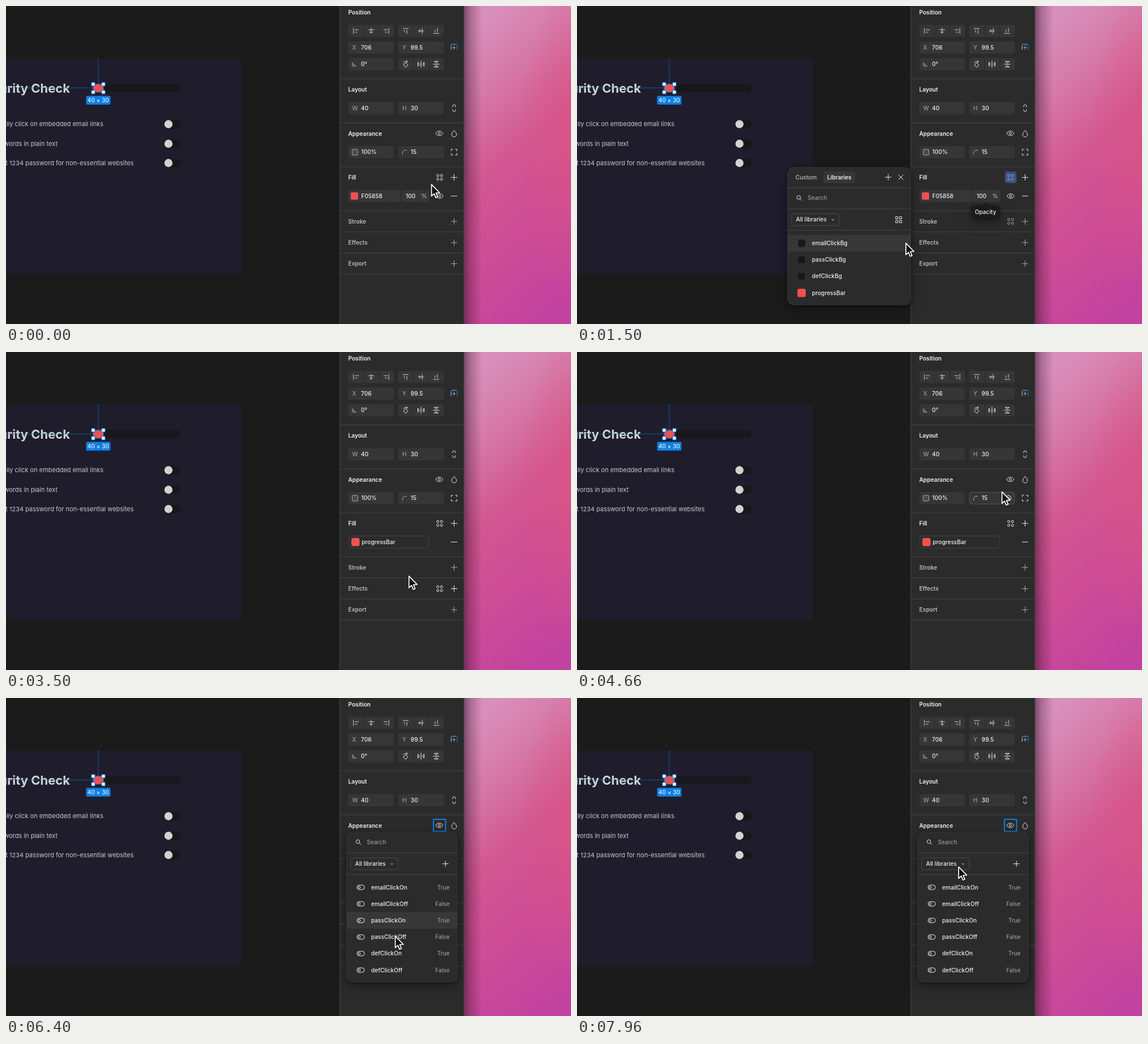
Write an HTML page that moves like this. It is 998x561 px and loops after 8 s.

```html
<!DOCTYPE html>
<html lang="en">
<head>
<meta charset="utf-8">
<title>Design panel</title>
<style>
  html, body { margin: 0; width: 100%; height: 100%; overflow: hidden; background: #1b1b1c; }
  svg { display: block; width: 998px; height: 561px; }
  text { font: 500 10.06px Inter, sans-serif; fill: #f2f2f2; letter-spacing: .005em; white-space: pre; }
  .bold { font-weight: 600; }
  .dim { fill: #9a9a9a; }
  .soft { fill: #bdbdbd; }
  .body { font-size: 11px; font-weight: 400; fill: #c9c8cb; letter-spacing: 0; }
  .title { font-size: 22px; font-weight: 700; fill: #d3d3d2; letter-spacing: 0; }
  .icon { fill: none; stroke: #ececec; stroke-width: 1; }
  .faint { stroke: #a8a8a8; }
  .popup { filter: drop-shadow(0 2px 3px #0007) drop-shadow(0 7px 11px #0004); }
  #cursor { filter: drop-shadow(0 1px 1px #0006); }
  #cursor path { fill: #111; stroke: #fff; stroke-width: 1.7; stroke-linejoin: round; }
</style>
</head>
<body>
<svg id="stage" viewBox="0 0 998 561" xmlns="http://www.w3.org/2000/svg"></svg>
<script>
const LOOP = 8000, BLUE = '#0d7fe3', RED = '#ef5150', FIELD = '#363637', LINE = '#454546';
const stage = document.getElementById('stage');

// Drawing helpers
const rect = (x, y, w, h, fill, r = 0, extra = '') =>
  `<rect x="${x}" y="${y}" width="${w}" height="${h}" rx="${r}" fill="${fill}" ${extra}/>`;
const outline = (x, y, w, h, r, color = LINE, width = 1) =>
  rect(x, y, w, h, 'none', r, `stroke="${color}" stroke-width="${width}"`);
const label = (x, cy, str, cls = '', anchor = 'start') =>
  `<text x="${x}" y="${cy + 3.6}" class="${cls}" text-anchor="${anchor}">${str}</text>`;
const icon = (x, y, d, cls = '') => `<path class="icon ${cls}" transform="translate(${x} ${y})" d="${d}"/>`;
const group = (id, content, cls = '') => `<g id="${id}" class="${cls}">${content}</g>`;
const rule = (y, x1 = 590, x2 = 809) => rect(x1, y - .5, x2 - x1, 1, '#434344');
const corners = (s, shape) => [[-s, -s], [s, -s], [-s, s], [s, s]].map(([x, y]) => shape(x, y)).join('');

const ring = (x, y, r) => `M${x - r} ${y}a${r} ${r} 0 1 0 ${2 * r} 0a${r} ${r} 0 1 0 ${-2 * r} 0`;
const PLUS = 'M-5.5 0H5.5M0-5.5V5.5', MINUS = 'M-5.5 0H5.5', CROSS = 'M-4.5-4.5L4.5 4.5M4.5-4.5L-4.5 4.5';
const EYE = 'M-6.3 0C-3.5-5.4 3.5-5.4 6.3 0C3.5 5.4-3.5 5.4-6.3 0Z' + ring(0, 0, 1.9);
const DOTS = corners(3.3, (x, y) => ring(x, y, 2));
const GRID = corners(3.3, (x, y) => `M${x - 2} ${y - 2}h4v4h-4z`);
const SEARCH = ring(-1, -1, 3.2) + 'M1.4 1.4L4.6 4.6';
const CHEVRON = 'M-2-1L0 1L2-1';
const TOGGLE = 'M-2.5-4H2.5A4 4 0 0 1 2.5 4H-2.5A4 4 0 0 1-2.5-4Z' + ring(-2.5, 0, 2);

function canvas() {
  const toggles = [208.5, 243, 277].map(y =>
    rect(279.5, y - 7.5, 29.5, 15, '#18171b', 7.5) + `<circle cx="287" cy="${y}" r="7.2" fill="#d3d2cf"/>`).join('');
  const line = (x, cy, str) => label(x, cy, str, 'body', 'end');
  const handles = [[154, 138], [172, 138], [154, 152], [172, 152]]
    .map(([x, y]) => rect(x - 3, y - 3, 6, 6, '#fff', 0, `stroke="${BLUE}"`)).join('');
  return rect(0, 0, 590, 561, '#1b1b1c') + rect(0, 93, 416, 379, '#1f1d2c') +
    `<text x="113" y="153" class="title" text-anchor="end">Security Check</text>` +
    line(172, 208.7, 'Occasionally click on embedded email links') +
    line(91, 243, 'Store passwords in plain text') +
    line(225.5, 277.3, 'Default 1234 password for non-essential websites') + toggles +
    rect(154, 138, 155, 14, '#18171b', 7) + rect(154, 138, 18.5, 14, RED, 7) +
    `<path d="M163 93V138M0 144.5H154" stroke="${BLUE}" stroke-dasharray="2.6 2" fill="none"/>` +
    outline(154, 138, 18, 14, 0, BLUE) + handles +
    rect(141.5, 158.5, 43, 15.5, BLUE, 2) + label(163, 166.4, '40 × 30', '', 'middle');
}

function backdrop() {
  const stop = (o, c, a = 1) => `<stop offset="${o}" stop-color="${c}" stop-opacity="${a}"/>`;
  return `<defs>
    <linearGradient id="pink" x1=".35" y1="0" x2=".65" y2="1">${stop(0, '#d88fbb')}${stop(.2, '#d67aa8')}
      ${stop(.45, '#d25791')}${stop(.7, '#ce4d96')}${stop(1, '#c2429f')}</linearGradient>
    <radialGradient id="glow" cx="1" cy=".45" r=".5">${stop(0, '#dc5580', .6)}${stop(1, '#dc5580', 0)}</radialGradient>
    <linearGradient id="edge">${stop(0, '#2d1428', .55)}${stop(.35, '#3a1430', .3)}${stop(1, '#3a1430', 0)}</linearGradient>
  </defs>` + rect(809, 0, 189, 561, 'url(#pink)') + rect(809, 0, 189, 561, 'url(#glow)') +
    rect(809, 0, 32, 561, 'url(#edge)');
}

function alignIcon(x, side, vertical) {
  const bars = { start: 'M-5-6V6M-2-2.5H6M-2 2.5H3', mid: 'M0-6V6M-6-2.5H6M-3.5 2.5H3.5', end: 'M5-6V6M2-2.5H-6M2 2.5H-3' };
  return `<path class="icon" stroke-width="1.4" transform="translate(${x} 44) rotate(${vertical ? 90 : 0}) scale(.85)" d="${bars[side]}"/>`;
}

function panel() {
  const field = (x, cy) => rect(x, cy - 10.7, 80.5, 21.4, FIELD, 4);
  const triple = (x, cy) => field(x, cy) + [26.5, 53.5].map(d => rect(x + d, cy - 11, 1, 22, '#2b2b2c')).join('');
  const pair = (cy, a, av, b, bv) => field(604.7, cy) + field(692.8, cy) +
    label(611.5, cy, a, 'dim') + label(627, cy, av) + label(700, cy, b, 'dim') + label(714.8, cy, bv);
  const head = (cy, str, cls = '') => label(604.5, cy, str, 'bold ' + cls);

  const position = head(11.7, 'Position') + triple(604.7, 44) + triple(692.8, 44) +
    ['start', 'mid', 'end'].map((s, i) => alignIcon(618 + 27 * i, s) + alignIcon(706 + 27 * i, s, true)).join('') +
    pair(73.3, 'X', '706', 'Y', '99.5') +
    `<path d="M786 68V78M797 68V78M789 67.5H795" stroke="#5d6f80" fill="none"/>` +
    `<path d="M787 67.5H796M786.5 69V77M791.5 70V77M788.5 73.5H794.5" stroke="#63b3ee" fill="none"/>` +
    field(604.7, 102.7) + triple(692.8, 102.7) + icon(615, 103, 'M-3-4V3H4M-3-1Q1-1 1 3', 'faint') + label(627, 102.7, '0°') +
    icon(706, 102.7, 'M0-2.5L4 1.5L0 5.5L-4 1.5ZM-4-2Q-3-5.5 3-4.5M1-6.5L3.2-4.4L1-2.5') +
    icon(733, 102.7, 'M0-6V6M-2.5 0L-5.5-3.5V3.5ZM2.5 0L5.5-3.5V3.5Z') +
    icon(760, 102.7, 'M-5.5 0H5.5M0-2L-3.5-5H3.5ZM0 2L-3.5 5H3.5Z');

  const layout = head(147.5, 'Layout') + pair(180.3, 'W', '40', 'H', '30') +
    icon(791.5, 180.3, 'M-2.5-2V-3.5A2.5 2.5 0 0 1 2.5-3.5V-2M-2.5 2V3.5A2.5 2.5 0 0 0 2.5 3.5V2');

  const appearance = head(225.2, 'Appearance') + icon(765.3, 224.7, EYE) +
    icon(791.5, 225, 'M0-5.5C2-3 4.3-.8 4.3 1.6A4.3 4.3 0 0 1-4.3 1.6C-4.3-.8-2-3 0-5.5Z') +
    field(604.7, 257.8) + field(692.8, 257.8) +
    rect(611.5, 253, 10, 10, '#4a4a4b', 1.5, 'stroke="#aaa"') + label(627.5, 257.8, '100%') +
    icon(704, 258, 'M-3.5 4V1A4.5 4.5 0 0 1 1-3.5H4', 'faint') + label(714.8, 257.8, '15') +
    icon(791.5, 257.8, 'M-5-2V-5H-2M2-5H5V-2M5 2V5H2M-2 5H-5V2') +
    group('radiusHover', outline(693.3, 247.3, 79.5, 20.8, 4, '#565657') +
      icon(762, 257.8, 'M0-5L4.4-2.5V2.5L0 5L-4.4 2.5V-2.5Z' + ring(0, 0, 1.5)));

  const fill = head(302.4, 'Fill') +
    group('fillActive', rect(756, 292, 20.3, 20.5, '#414f7a', 4)) +
    `<path id="fillDots" class="icon" transform="translate(766 302.4)" d="${DOTS}"/>` + icon(791.5, 302.4, PLUS) +
    group('rawColor', rect(604.7, 324.6, 92.3, 21.4, FIELD, 4) + rect(698, 324.6, 50, 21.4, FIELD, 4) +
      rect(609, 328.8, 13, 13, RED, 2) + label(627.5, 335.3, 'F05858') + label(706, 335.3, '100') +
      label(733.5, 335.3, '%', 'soft') + icon(766, 335.3, EYE)) +
    group('linkedColor', outline(605.3, 324.5, 141.5, 21.5, 5) + rect(610, 328, 14.6, 14.6, RED, 3.5) +
      label(628.3, 335.3, 'progressBar')) + icon(791.5, 335.3, MINUS);

  const closed = [[380, 'Stroke'], [417.4, 'Effects'], [454.7, 'Export']].map(([y, name]) =>
    head(y, name, 'soft') + icon(791.5, y, PLUS, 'faint')).join('');

  return rect(590, 0, 219, 561, '#2b2b2c') + rect(589, 0, 1, 561, '#434344') + rect(808.5, 0, 1, 561, '#504a4d') +
    [128.5, 206.2, 283.7, 361.2, 398.5, 435.8, 473].map(y => rule(y)).join('') +
    position + layout + appearance + fill + closed +
    group('strokeHover', icon(766, 380, DOTS, 'faint')) +
    group('effectsHover', icon(766, 417.4, DOTS) + icon(791.5, 417.4, PLUS));
}

const caret = (id, x, cy) => rect(x, cy - 6, 1, 12, '#f2f2f2', 0, `id="${id}"`);
const dropdown = (x, cy) => outline(x, cy - 10.5, 84, 21, 4, '#4b4b4c') +
  label(x + 7.8, cy, 'All libraries') + icon(x + 73, cy + .3, CHEVRON);

function libraryPopup() {
  const names = ['emailClickBg', 'passClickBg', 'defClickBg', 'progressBar'];
  const rows = names.map((name, i) => {
    const y = 418.5 + 29.15 * i;
    const swatch = i < 3 ? rect(390, y - 6.8, 13.6, 13.6, '#18181a', 3, 'stroke="#343436"') : rect(389.3, y - 7.3, 14.8, 14.8, RED, 3.5);
    return swatch + label(415, y, name);
  }).join('');
  return `<g class="popup">${rect(371.5, 284.5, 218.5, 243, '#2b2b2c', 11)}</g>` +
    outline(372, 285, 217.5, 242.3, 10.5, '#363637') +
    label(386, 302, 'Custom', 'soft') + rect(435, 291.5, 56.3, 21, FIELD, 4) + label(442, 302, 'Libraries', 'bold') +
    icon(549.7, 302, PLUS) + icon(572, 302, CROSS) + rule(320.5, 372, 589) +
    icon(392.5, 338.8, SEARCH) + label(407.5, 338.8, 'Search', 'dim') + caret('caret1', 407, 338.8) + rule(357.8, 372, 589) +
    dropdown(379, 376.8) + icon(568.2, 377, GRID) + rule(395.5, 372, 589) +
    rect(372, 0, 217.5, 29.15, '#373738', 0, 'id="row1"') + rows;
}

function variablePopup() {
  const names = ['email', 'pass', 'def'].flatMap(n => [n + 'ClickOn', n + 'ClickOff']);
  const rows = names.map((name, i) => {
    const y = 334 + 29.2 * i;
    return icon(626.5, y, TOGGLE) + label(645, y, name) + label(783.7, y, i % 2 ? 'False' : 'True', 'dim', 'end');
  }).join('');
  return outline(755, 214, 21.5, 21.5, 1, BLUE, 2) +
    `<g class="popup">${rect(601, 236.5, 197, 265, '#2b2b2c', 11)}</g>` +
    outline(601.5, 237, 196, 264, 10.5, '#343435') +
    icon(622.5, 254.3, SEARCH) + label(637.5, 254.3, 'Search', 'dim') + caret('caret2', 637, 254.3) + rule(273.2, 601, 798) +
    dropdown(608.7, 292.5) + icon(776.2, 292.5, PLUS) + rule(311.5, 601, 798) +
    rect(601.5, 0, 196, 29.2, '#373738', 0, 'id="row2"') + rows;
}

stage.innerHTML = canvas() + backdrop() + panel() +
  group('tooltip', `<g class="popup">${rect(697, 352, 49, 22, '#1b1b1b', 5)}<path d="M717 352L722 347L727 352Z" fill="#1b1b1b"/></g>` +
    label(721.6, 363, 'Opacity', '', 'middle')) +
  group('popup1', libraryPopup()) + group('popup2', variablePopup()) +
  group('cursor', '<path id="pointer" d="M.6.8V21.3L5.2 17.1L8.2 24.2L11.5 22.8L8.6 15.9L15 15.5Z"/>' +
    '<path id="arrow" d="M.9.9L18 6.9L10.3 10.2L6.5 18.4Z"/>');

// Pointer route: time, x, y
const ROUTE = [
  [0, 751, 314], [150, 757.5, 309], [460, 762.7, 305], [700, 763, 305], [1300, 763, 305], [1400, 706, 335],
  [1500, 581, 417], [1620, 524, 463], [1800, 491, 494], [2060, 480.3, 504.8], [2130, 479.5, 505], [3200, 479.5, 505],
  [3350, 620, 455], [3500, 711, 395], [3620, 724, 360], [3800, 725, 335], [4330, 725, 335], [4500, 739, 283],
  [4660, 750, 246], [4850, 758, 232], [5100, 762, 226], [5800, 762, 226], [6000, 746, 274], [6200, 712, 345],
  [6300, 699, 384], [6400, 687, 419], [6600, 681, 455], [6850, 678, 481], [7050, 677.5, 479], [7250, 676.5, 440],
  [7460, 675, 382], [7700, 674, 325], [7960, 673.5, 297], [8000, 673.5, 297]
];

const slope = (i, axis) => (ROUTE[i + 1][axis] - ROUTE[i][axis]) / (ROUTE[i + 1][0] - ROUTE[i][0]);
function tangent(i, axis) {
  if (i === 0 || i === ROUTE.length - 1) return 0;
  const a = slope(i - 1, axis), b = slope(i, axis);
  return a * b <= 0 ? 0 : 2 * a * b / (a + b);
}
function pointerAt(t) {
  let i = 0;
  while (i < ROUTE.length - 2 && t >= ROUTE[i + 1][0]) i++;
  const span = ROUTE[i + 1][0] - ROUTE[i][0], u = Math.max(0, (t - ROUTE[i][0]) / span), v = 1 - u;
  return [1, 2].map(axis =>
    ROUTE[i][axis] * (1 + 2 * u) * v * v + ROUTE[i + 1][axis] * u * u * (3 - 2 * u) +
    span * u * v * (tangent(i, axis) * v - tangent(i + 1, axis) * u));
}

const $ = id => document.getElementById(id);
const show = (id, on) => { $(id).style.display = on ? '' : 'none'; };
const within = (v, a, b) => v >= a && v < b;

function highlight(id, y, top, height, count) {
  const row = Math.floor((y - top) / height);
  show(id, row >= 0 && row < count);
  $(id).setAttribute('y', top + row * height);
}

function render(t) {
  const [x, y] = pointerAt(t), [hx, hy] = pointerAt(t - 50);
  const open1 = within(t, 960, 2530), open2 = t >= 5460, active = within(t, 860, 2530);
  const overPanel = hx > 590 && !open2;

  show('popup1', open1);
  show('popup2', open2);
  show('fillActive', active);
  $('fillDots').style.stroke = active ? '#78b0f6' : '';
  show('rawColor', t < 2530);
  show('linkedColor', t >= 2530);
  show('strokeHover', overPanel && within(hy, 361, 398.5));
  show('effectsHover', overPanel && within(hy, 398.5, 436));
  show('radiusHover', overPanel && within(hx, 693, 773) && within(hy, 247, 268.5));
  show('tooltip', within(t, 1430, 1570));

  // Carets blink on a one second cycle from the moment each popup opens
  show('caret1', (t - 960) % 1000 < 500);
  show('caret2', (t - 5460) % 1000 < 500);
  highlight('row1', x < 590 ? y : 0, 404, 29.15, 4);
  highlight('row2', hy, 319.4, 29.2, 6);

  const overCanvas = t >= 2430 && x < 590;
  show('arrow', overCanvas);
  show('pointer', !overCanvas);
  $('cursor').setAttribute('transform', `translate(${x.toFixed(2)} ${y.toFixed(2)})`);
}

function tick() {
  render(performance.now() % LOOP);
  requestAnimationFrame(tick);
}
tick();
</script>
</body>
</html>
```
